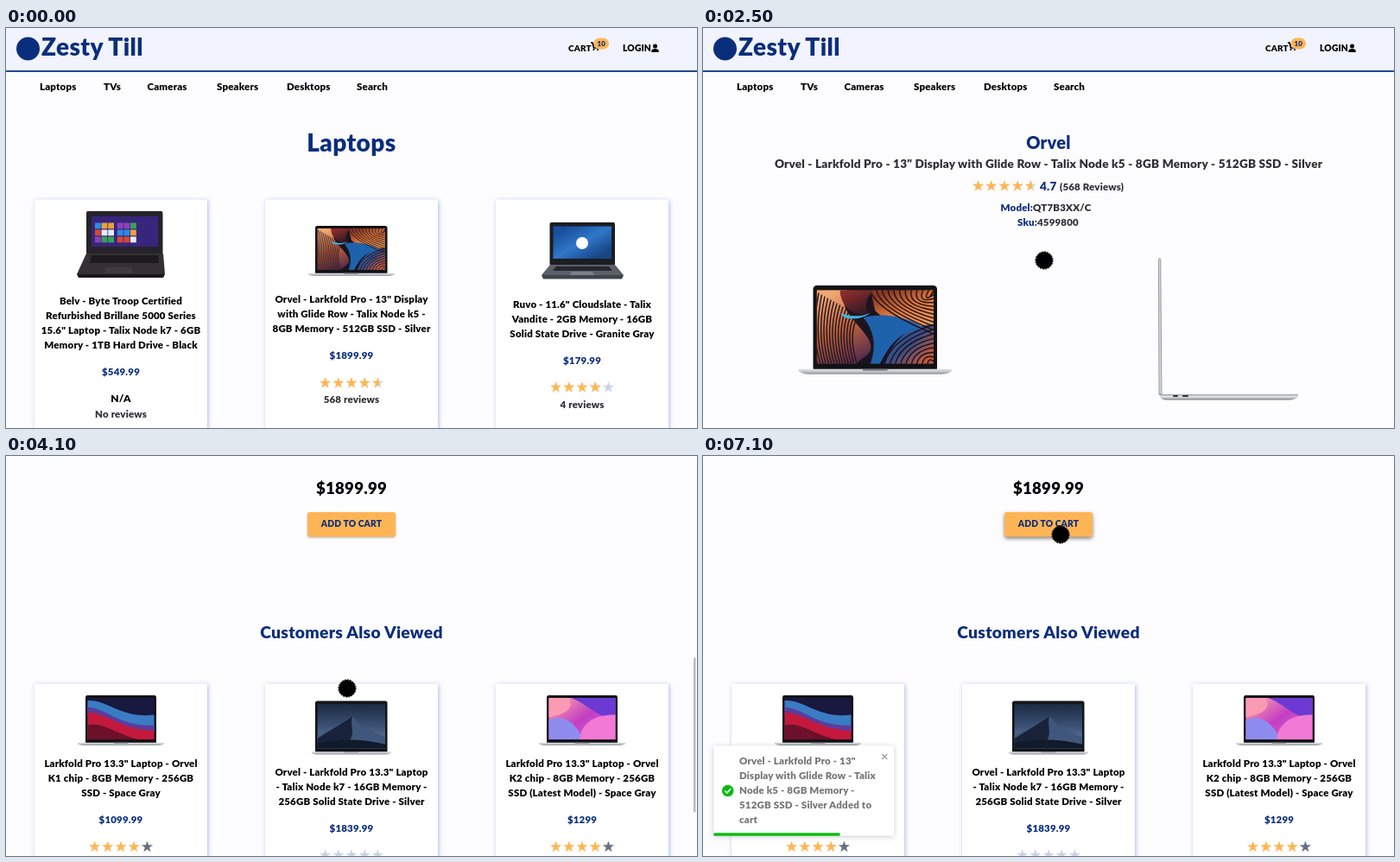
An HTML page that plays this animation: 800x463 px, repeating every 7.2 s.

```html
<!DOCTYPE html>
<html lang="en">
<head>
<meta charset="utf-8">
<title>Shop demo</title>
<style>
  html, body { margin: 0; width: 100%; height: 100%; overflow: hidden; background: #fdfcff; }
  svg { display: block; }
  text { font-family: Lato, "Open Sans", sans-serif; font-weight: 900; letter-spacing: .015em; white-space: pre; }
  .card { fill: #fff; filter: drop-shadow(1.5px 1.5px 2.5px rgba(70, 105, 200, .45)); }
  .button { fill: #ffb555; filter: drop-shadow(0 1px 1px rgba(0, 0, 0, .3)); }
  .button.hover { filter: drop-shadow(0 2px 2px rgba(0, 0, 0, .5)); }
  .toast { fill: #fff; filter: drop-shadow(0 1px 3px rgba(0, 0, 0, .2)); }
</style>
</head>
<body>
<svg id="stage" width="800" height="463" viewBox="0 0 800 463"></svg>
<script>
const NAVY = '#0b2e7c', ORANGE = '#ffb555', LAVENDER = '#cdd2e8', SLATE = '#68707f', DARK = '#2e2e35', GREEN = '#07bc0c';
const LOOP = 7200, STEP = 100, END_SCROLL = 600;

// ---------- drawing helpers ----------
const text = (x, y, size, str, fill = '#000', anchor = 'middle') =>
  `<text x="${x}" y="${y}" font-size="${size}" fill="${fill}" text-anchor="${anchor}">${str}</text>`;
const lines = (x, y, size, pitch, rows, fill, anchor) =>
  rows.map((row, i) => text(x, y + i * pitch, size, row, fill, anchor)).join('');
const rect = (x, y, w, h, fill, extra = '') =>
  `<rect x="${x}" y="${y}" width="${w}" height="${h}" fill="${fill}" ${extra}/>`;
const path = (d, fill, extra = '') => `<path d="${d}" fill="${fill}" ${extra}/>`;
const circle = (x, y, r, fill, extra = '') => `<circle cx="${x}" cy="${y}" r="${r}" fill="${fill}" ${extra}/>`;
const gradient = (id, angle, ...stops) =>
  `<linearGradient id="${id}" gradientTransform="rotate(${angle} .5 .5)">` +
  stops.map((c, i) => `<stop offset="${i / (stops.length - 1)}" stop-color="${c}"/>`).join('') + '</linearGradient>';

function star(x, y, fill) {
  const points = Array.from({ length: 10 }, (_, i) => {
    const r = i % 2 ? 2.8 : 7, a = i * Math.PI / 5 - Math.PI / 2;
    return `${(x + r * Math.cos(a)).toFixed(2)},${(y + r * Math.sin(a)).toFixed(2)}`;
  });
  return `<polygon points="${points.join(' ')}" fill="${fill}"/>`;
}
const stars = (x, y, rating, empty = LAVENDER) => [0, 1, 2, 3, 4].map(i =>
  star(x + (i - 2) * 15.2, y, rating >= i + 1 ? ORANGE : rating > i ? 'url(#partStar)' : empty)).join('');

// Wallpapers are drawn in a 100 x 64 box.
const stripes = (count, curve, color) => Array.from({ length: count }, (_, i) =>
  path(curve(i), 'none', `stroke="${color}" stroke-width="1.1"`)).join('');
const wallpapers = {
  swirl: rect(0, 0, 100, 64, '#1b1420') +
    path('M0 0H26C16 16 36 28 44 42S38 58 34 64H0Z', 'url(#ember)') +
    path('M46 0H100V40C84 24 66 34 50 18Z', 'url(#flame)') +
    path('M100 30C80 30 66 42 58 64H100Z', 'url(#dusk)') +
    path('M40 24C58 18 86 26 92 34C74 34 64 44 54 64H46C52 46 48 34 40 24Z', '#1f62ac') +
    stripes(17, i => `M${i * 2.6 - 6} ${i * 1.5 - 2}Q${i * 2.4 - 12} 38 ${i * 2.4 - 4} 64`, '#2a1620') +
    stripes(12, i => `M${46 + i * 5} 0Q${50 + i * 4} ${17 - i * .6} 100 ${38 - i * 3.4}`, '#26141a') +
    stripes(9, i => `M${58 + i * 4.6} 64Q${64 + i * 4} ${42 + i * 2} 100 ${30 + i * 4}`, '#141425') +
    path('M20 0H50C39 8 42 18 46 22C32 24 20 14 20 0Z', 'url(#wine)') +
    path('M20 20Q34 25 46 20Q36 27 24 24Z', '#3cb4e6'),
  bands: rect(0, 0, 100, 64, '#19183f') +
    path('M0 4C30 2 50 32 100 26V50C56 50 34 22 0 20Z', '#3a7cc4') +
    path('M0 14C34 18 46 44 100 42V54C50 54 34 32 0 28Z', '#5c3c9c') +
    path('M0 22C30 24 52 50 100 50V64H0Z', '#c4193c') +
    path('M0 42C24 36 46 58 78 64H0Z', '#6d1029'),
  dune: rect(0, 0, 100, 64, 'url(#night)') +
    path('M0 46L26 32L52 18L64 32L100 48V64H0Z', '#40577d') +
    path('M52 18C46 34 62 46 36 64H0V50Z', '#18233a') +
    path('M0 56Q50 46 100 58V64H0Z', '#101a2b'),
  bloom: rect(0, 0, 100, 64, 'url(#pink)') +
    path('M34 0H100V30C76 34 62 12 34 0Z', '#6c3ad2') +
    path('M0 34C24 24 40 38 52 64H0Z', '#8f8cf0') +
    path('M46 64C50 34 74 26 100 26V64Z', '#f27ad4') +
    path('M0 0H30C40 18 20 26 0 30Z', '#fa9ab4'),
};

function frontLaptop(x, y, w, h, baseWidth, wallpaper) {
  const inset = w * .028, cx = x + w / 2, bx = cx - baseWidth / 2, edge = baseWidth * .03;
  return rect(x, y, w, h, '#111216', `rx="${w * .03}"`) +
    `<svg x="${x + inset}" y="${y + inset * 1.3}" width="${w - 2 * inset}" height="${h - inset * 3.6}" viewBox="0 0 100 64" preserveAspectRatio="none">${wallpapers[wallpaper]}</svg>` +
    path(`M${bx} ${y + h - edge * .6}h${baseWidth}v${edge * .5}q${-edge} ${edge * .6} ${-edge * 2} ${edge * .6}h${-baseWidth + edge * 4}q${-edge} 0 ${-edge * 2} ${-edge * .6}z`, 'url(#silver)') +
    rect(cx - w * .1, y + h - edge * .6, w * .2, edge * .35, '#777b82');
}

function tileLaptop() {
  const colors = ['#2d8ce0', '#e8edf5', '#d14a36', '#36a35a', '#8b42b8', '#e8a33a'];
  let tiles = '';
  for (let row = 0; row < 3; row++)
    for (let col = 0; col < 6; col++)
      tiles += rect(103 + col * 7.6 + (col > 2 ? 3 : 0), 225.5 + row * 8, 6.8, 6.8, colors[(col * 5 + row * 2 + (col >> 1)) % 6]);
  return rect(93, 212, 88.5, 50, '#26242a', 'rx="2"') + rect(99, 218, 77, 35, '#38257c') + tiles +
    path('M93 261H182L184 285H82Z', '#343033') + path('M99 263H176L177 272H97Z', '#1c1a1d') +
    path('M116 277H146L147 284H114Z', '#3f3a3d') + path('M82 285H184L182 289H84Z', '#18171a');
}
const slateLaptop = () =>
  rect(629.5, 225, 75.5, 50, '#1b1d22', 'rx="2"') + rect(633.5, 229.5, 67.5, 37.5, 'url(#blueScreen)') +
  circle(667, 249, 7, '#fff') +
  path('M630 274H705L715 286H620Z', '#5b6069') + path('M637 276H698L702 281H633Z', '#25272d') +
  path('M655 282H679L681 286H653Z', '#7c818a') + path('M620 286H715L713 290.5H622Z', '#3e434c');
const sideLaptop = () =>
  path('M527.4 268Q528.6 265 529.8 268L531 424H528Z', '#d6d7da', 'stroke="#777a80" stroke-width=".7"') +
  path('M528 424H689V426.5Q686 430.5 678 430.5H536Q529 430 528 424Z', 'url(#slab)') +
  rect(544, 425, 6, 2, '#333', 'rx="1"') + rect(555, 425, 7, 2, '#333', 'rx="1"');

const card = (cx, top) => `<rect class="card" x="${cx - 100}" y="${top}" width="200" height="290"/>`;
const product = (cx, y, names, price) =>
  lines(cx, y, 11.5, 17.1, names) + text(cx, y + (names.length - 1) * 17.1 + 31, 11.5, price, NAVY);

// ---------- page content ----------
const [LEFT, MID, RIGHT] = [133, 400, 667];

const header = rect(0, 0, 800, 50, '#f1f3ff') + rect(0, 49, 800, 2, '#234a90') +
  circle(25.5, 24, 13.5, NAVY) + text(41, 32, 28, 'Zesty Till', NAVY, 'start') +
  text(651, 27, 10, 'CART', '#000', 'start') +
  path('M677 17h2l1.5 6h5l1-4h-6', 'none', 'stroke="#000" stroke-width="1.6"') +
  circle(680.5, 25, 1.1, '#000') + circle(685, 25, 1.1, '#000') +
  rect(680.5, 11.5, 17.5, 13, ORANGE, 'rx="6.5"') + text(689.3, 21, 8, '10', NAVY) +
  text(714, 27, 10.3, 'LOGIN', '#000', 'start') +
  circle(751.5, 21, 2.5, '#000') + path('M747.3 28V26.5Q747.5 24 751.5 24T755.7 26.5V28Z', '#000') +
  [[39, 'Laptops'], [113, 'TVs'], [163.5, 'Cameras'], [244, 'Speakers'], [325, 'Desktops'], [406, 'Search']]
    .map(([x, label]) => text(x, 72, 11.5, label, '#000', 'start')).join('');

const listPage = text(400, 143, 28, 'Laptops', NAVY) + [LEFT, MID, RIGHT].map(x => card(x, 198.5)).join('') +
  tileLaptop() + frontLaptop(358, 229, 83.5, 56.5, 100, 'swirl') + slateLaptop() +
  product(LEFT, 320, ['Belv - Byte Troop Certified', 'Refurbished Brillane 5000 Series',
    '15.6" Laptop - Talix Node k7 - 6GB', 'Memory - 1TB Hard Drive - Black'], '$549.99') +
  text(LEFT, 433, 12, 'N/A') + text(LEFT, 450.5, 11.5, 'No reviews', DARK) +
  product(MID, 318, ['Orvel - Larkfold Pro - 13" Display', 'with Glide Row - Talix Node k5 -',
    '8GB Memory - 512GB SSD - Silver'], '$1899.99') +
  stars(MID, 411, 4.7) + text(MID, 434, 11.5, '568 reviews', DARK) +
  product(RIGHT, 324, ['Ruvo - 11.6" Cloudslate - Talix', 'Vandite - 2GB Memory - 16GB',
    'Solid State Drive - Granite Gray'], '$179.99') +
  stars(RIGHT, 416, 4) + text(RIGHT, 440, 11.5, '4 reviews', DARK);

const related = text(400, 44, 18.6, '$1899.99') +
  '<rect id="button" class="button" x="349" y="65" width="102" height="28.5" rx="3"/>' +
  text(400, 81.5, 10.3, 'ADD TO CART', NAVY) +
  text(400, 211, 19.3, 'Customers Also Viewed', NAVY) +
  [LEFT, MID, RIGHT].map(x => card(x, 263.5)).join('') +
  frontLaptop(92, 277, 82, 56.5, 100, 'bands') + frontLaptop(358, 283.5, 83.5, 60.5, 92, 'dune') +
  frontLaptop(626, 277, 82, 56.5, 100, 'bloom') +
  product(LEFT, 360, ['Larkfold Pro 13.3" Laptop - Orvel', 'K1 chip - 8GB Memory - 256GB', 'SSD - Space Gray'], '$1099.99') +
  product(MID, 370, ['Orvel - Larkfold Pro 13.3" Laptop', '- Talix Node k7 - 16GB Memory -',
    '256GB Solid State Drive - Silver'], '$1839.99') +
  product(RIGHT, 360, ['Larkfold Pro 13.3" Laptop - Orvel', 'K2 chip - 8GB Memory - 256GB',
    'SSD (Latest Model) - Space Gray'], '$1299') +
  stars(LEFT, 452.5, 4, SLATE) + stars(MID, 462, 0) + stars(RIGHT, 452.5, 4, SLATE);

const detailPage = text(400, 140, 20, 'Orvel', NAVY) +
  text(400, 162, 13.6, 'Orvel - Larkfold Pro - 13" Display with Glide Row - Talix Node k5 - 8GB Memory - 512GB SSD - Silver', DARK) +
  stars(349, 183, 4.7) + text(390, 188, 13.5, '4.7', NAVY, 'start') + text(413, 188, 11.5, '(568 Reviews)', DARK, 'start') +
  text(382, 212, 11.5, 'Model:', NAVY, 'end') + text(382, 212, 11.5, 'QT7B3XX/C', DARK, 'start') +
  text(387, 228.5, 11.5, 'Sku:', NAVY, 'end') + text(387, 228.5, 11.5, '4599800', DARK, 'start') +
  `<g id="photos">${frontLaptop(127.5, 298, 143.5, 100, 177, 'swirl')}${sideLaptop()}</g>` +
  lines(400, 508.5, 13.5, 20.5, [
    'Larkfold Pro has a new eighth-generation quad-core Talix processor with Rapid',
    'Surge up to 4.1GHz. A brilliant and colorful Glista display with Real Tint',
    'technology for a more true-to-life viewing experience. The latest Orvel-designed',
    "keyboard. And the versatile Glide Row for more ways to be productive. It's Orvel's",
    'most powerful 13-inch notebook. Pushed even further.'], NAVY) +
  `<g transform="translate(0 ${END_SCROLL})">${related}</g>`;

const toast = '<rect class="toast" x="12.5" y="335.5" width="208.5" height="104" rx="1"/>' +
  circle(28.7, 387.5, 6.8, GREEN) + path('M25.3 387.5l2.5 2.6 4.4-5', 'none', 'stroke="#fff" stroke-width="1.7"') +
  lines(42, 356.5, 11.5, 17.1, ['Orvel - Larkfold Pro - 13"', 'Display with Glide Row - Talix',
    'Node k5 - 8GB Memory -', '512GB SSD - Silver Added to', 'cart'], '#757575', 'start') +
  path('M207.3 345l6 6m0-6l-6 6', 'none', 'stroke="#999" stroke-width="1.2"') +
  rect(12.5, 436.3, 208.5, 3.4, GREEN, 'id="progress"');

const stage = document.getElementById('stage');
stage.innerHTML = `<defs>
  <linearGradient id="partStar"><stop offset=".62" stop-color="${ORANGE}"/><stop offset=".62" stop-color="${LAVENDER}"/></linearGradient>
  ${gradient('silver', 90, '#e4e5e8', '#c3c5c9', '#8e9196')}
  ${gradient('slab', 90, '#8f9298', '#e6e7e9', '#c2c4c8', '#6d7076')}
  ${gradient('blueScreen', 45, '#1b4f9c', '#2f77c9', '#184585')}
  ${gradient('ember', 70, '#f0a873', '#c0643c', '#5b2f4c')}
  ${gradient('flame', 60, '#8a3a24', '#e8803f', '#e9a05c')}
  ${gradient('dusk', 40, '#2a5fa6', '#3a4a80', '#c4583a')}
  ${gradient('wine', 60, '#8c2c2c', '#2c1822')}
  ${gradient('night', 90, '#1c2940', '#3b5175', '#7187a8')}
  ${gradient('pink', 40, '#f48bb0', '#c13ec4', '#e35ed0')}
</defs>
${rect(0, 0, 800, 463, '#fdfcff')}
<g id="page">${header}<g id="list">${listPage}</g><g id="detail">${detailPage}</g></g>
${rect(796, 3, 2.5, 179, '#b9b9be', 'id="scrollbar" rx="1.2"')}
<g id="toast">${toast}</g>
<g id="cursor">${circle(0, 0, 10, '#000')}${circle(0, 0, 10.2, 'none', 'stroke="#000" stroke-width="1" stroke-dasharray="1.6 1.6"')}</g>`;

const part = Object.fromEntries([...stage.querySelectorAll('g[id], rect[id]')].map(el => [el.id, el]));

// ---------- motion ----------
const clamp = v => Math.min(1, Math.max(0, v));
const show = (el, on) => { el.style.display = on ? '' : 'none'; };
const move = (el, x, y) => el.setAttribute('transform', `translate(${x.toFixed(2)} ${y.toFixed(2)})`);

// Piecewise interpolation over rows of [time, ...values].
function along(keys, t, ease = u => u) {
  const next = keys.findIndex(k => k[0] > t);
  if (next === 0) return keys[0].slice(1);
  if (next < 0) return keys[keys.length - 1].slice(1);
  const a = keys[next - 1], b = keys[next], u = ease((t - a[0]) / (b[0] - a[0]));
  return a.slice(1).map((v, i) => v + (b[i + 1] - v) * u);
}

const CURSOR = [[200, 812, 72], [900, 389, 217], [1300, 395, 269], [4400, 395, 269], [5000, 412, 111], [5300, 414, 91]];
const TOAST_START = 5600, TOAST_LIFE = 5000;
const BOUNCE = [[0, -1960, 0], [420, 16, 1], [525, -6.5, 1], [630, 3.3, 1], [700, 0, 1]];
const easeOut = u => 1 - (1 - u) ** 3;

function draw(t) {
  const onDetail = t >= 1400;
  show(part.list, !onDetail);
  show(part.detail, onDetail);
  show(part.photos, t >= 1700);

  const scroll = END_SCROLL * (1 - (1 - clamp((t - 2700) / 1400)) ** 1.3);
  move(part.page, 0, -Math.round(scroll));
  part.scrollbar.setAttribute('y', 3 + scroll * .384);
  part.scrollbar.setAttribute('opacity', t < 2800 ? 0 : 1 - clamp((t - 4500) / 300));

  show(part.cursor, t >= 200);
  move(part.cursor, ...along(CURSOR, t));
  part.button.classList.toggle('hover', t >= 5200);

  const age = t - TOAST_START;
  const [x, opacity] = along(BOUNCE, age, easeOut);
  show(part.toast, age >= 0);
  move(part.toast, x, 0);
  part.toast.setAttribute('opacity', opacity);
  part.progress.setAttribute('width', 208.5 * (1 - clamp(age / TOAST_LIFE)));
}

const start = performance.now();
function tick() {
  const t = (performance.now() - start) % LOOP;
  draw(Math.floor(t / STEP) * STEP); // ten pictures a second
  requestAnimationFrame(tick);
}
tick();
</script>
</body>
</html>
```
